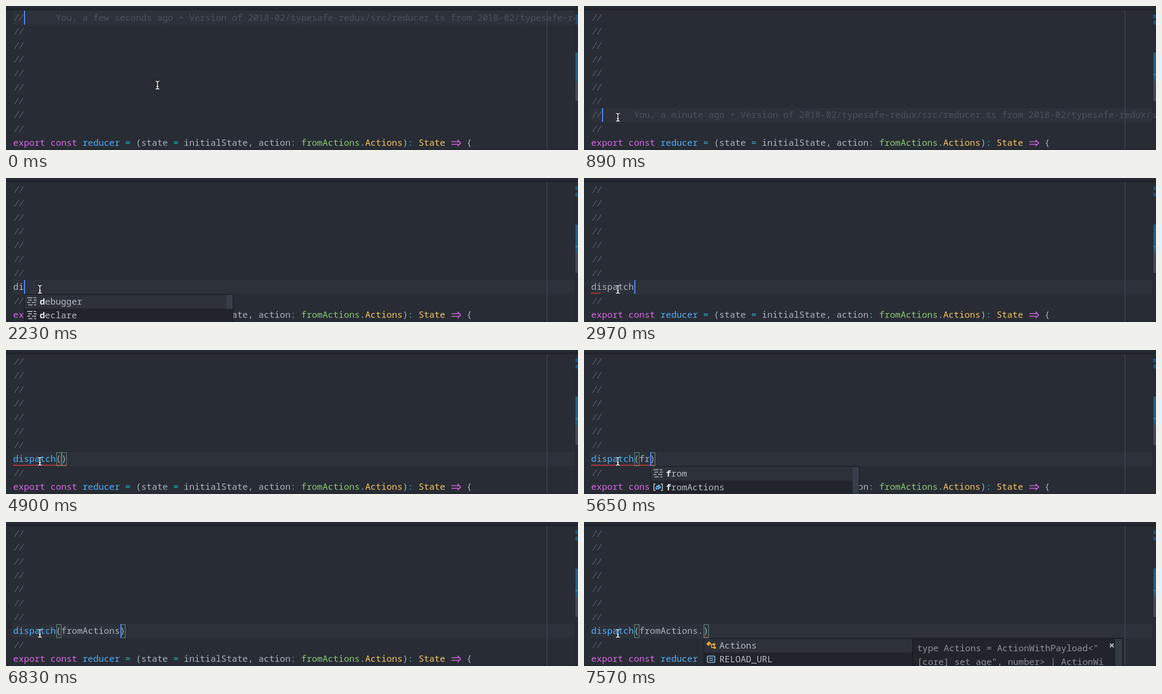
Recreate the animation shown at these times as an HTML page. Size 1080x273 px, loop 8 s.

```html
<!DOCTYPE html>
<html lang="en">
<head>
<meta charset="utf-8">
<title>Editor autocomplete</title>
<style>
  html, body { margin: 0; width: 100%; height: 100%; overflow: hidden; background: #282c34; }
  svg { display: block; width: 1080px; height: 273px; }
  text { font: 16.8px "Noto Sans Mono", "DejaVu Sans Mono", monospace; fill: #abb2bf; white-space: pre; font-variant-ligatures: none; }
  .comment { font-style: italic; fill: #5c6370; letter-spacing: -1.2px; }
  .blame { fill: #4c525d; }
  .kw { fill: #d968e6; }
  .fn { fill: #4db1fa; }
  .op { fill: #2bbac5; }
  .ns { fill: #8bcb72; }
  .type { fill: #f3c463; }
  .item { fill: #b6bac2; }
  .hit { fill: #e4e7ec; font-weight: 700; }
  .doc { fill: #8c929d; }
  .line { fill: none; }
</style>
</head>
<body>
<svg id="stage" viewBox="0 0 1080 273"></svg>
<script>
const LOOP = 8000, CHAR = 10.08, LEFT = 13.6, LINE = 26.35, TOP = 9;
const LIST_W = 395, DOC_W = 396, EDIT_ROW = 7;

const colX = c => LEFT + c * CHAR;
const snapX = c => Math.ceil(colX(c));
const rowY = r => TOP + r * LINE;
const esc = s => s.replace(/&/g, '&amp;').replace(/</g, '&lt;').replace(/>/g, '&gt;');
const rect = (x, y, w, h, fill, extra = '') =>
  `<rect x="${x}" y="${y}" width="${w}" height="${h}" fill="${fill}" ${extra}/>`;
const span = (cls, s) => `<tspan class="${cls}">${esc(s)}</tspan>`;
const text = (x, y, body, cls = '') => `<text x="${x}" y="${y}" class="${cls}">${body}</text>`;
const path = (d, color, width) =>
  `<path class="line" d="${d}" stroke="${color}" stroke-width="${width}"/>`;
const codeLine = (r, body, cls) => text(LEFT, rowY(r) + 18.8, body, cls);

const repo = '2018-02/typesafe-redux/src/reducer.ts';
const blameText = age => `You, ${age} ago • Version of ${repo} from ${repo}`;

const lists = {
  d: { items: [['word', 'debugger', 1], ['word', 'declare', 1]], thumb: 26, doc: ['debugger'] },
  f: { items: [['word', 'from', 1], ['cube', 'fromActions', 1]], thumb: 52, doc: ['from'] },
  from: { items: [['word', 'from', 4], ['cube', 'fromActions', 4]], thumb: 52, doc: ['from'] },
  member: {
    items: [['type', 'Actions', 0], ['value', 'RELOAD_URL', 0]], thumb: 0,
    doc: ['type Actions = ActionWithPayload<"', '[core] set age", number> | ActionWi'], docThumb: 52
  }
};

// Each step changes only the listed fields and holds until the next one.
const start = {
  move: 0, row: 0, caret: 2, blame: 'a few seconds', sel: false, marks: false,
  code: null, call: false, wave: null, pair: null, list: null, at: 0, doc: false
};
const changes = [
  [150, { move: .1 }],
  [300, { move: .38 }],
  [450, { move: .74 }],
  [600, { move: .95 }],
  [740, { move: 1, row: EDIT_ROW, blame: null }],
  [890, { blame: 'a minute' }],
  [1190, { sel: true, row: -1, caret: -1, blame: null }],
  [1340, { marks: true }],
  [1780, { blame: 'a minute' }],
  [1930, { sel: false, marks: false, blame: null, row: EDIT_ROW, code: 'd', caret: 1 }],
  [2080, { list: 'd', at: 1 }],
  [2230, { code: 'di', caret: 2, at: 2 }],
  [2380, { wave: [0, 2] }],
  [2520, { doc: true }],
  [2820, { code: 'dispatc', caret: 7, list: null, doc: false }],
  [2970, { code: 'dispatch', caret: 8 }],
  [3270, { wave: null }],
  [3570, { caret: -1 }],
  [4010, { code: 'dispatch()', caret: 9 }],
  [4160, { call: true }],
  [4460, { wave: [0, 10], pair: [8, 9] }],
  [4900, { caret: -1 }],
  [5500, { code: 'dispatch(f)', caret: 10, wave: [0, 11], pair: [8, 10] }],
  [5650, { code: 'dispatch(fr)', caret: 11, wave: [0, 12], pair: [8, 11], list: 'f', at: 11 }],
  [5790, { code: 'dispatch(fro)', caret: 12, wave: [0, 13], pair: [8, 12], at: 12, doc: true }],
  [6090, { code: 'dispatch(from)', caret: 13, wave: null, pair: [8, 13], list: 'from', at: 13, doc: false }],
  [6240, { wave: [9, 13], caret: -1 }],
  [6390, { doc: true }],
  [6680, { code: 'dispatch(fromActions)', caret: 20, wave: [9, 20], pair: [8, 20], list: null, doc: false }],
  [6830, { wave: null }],
  [6980, { code: 'dispatch(fromActions.)', caret: 21, pair: [8, 21] }],
  [7130, { list: 'member', at: 21 }],
  [7270, { wave: [21, 22] }],
  [7420, { doc: true }],
  [7570, { caret: -1 }]
];
const steps = [[0, start]];
for (const [t, part] of changes) steps.push([t, { ...steps[steps.length - 1][1], ...part }]);

const icons = {
  word: (x, y) => path(
    `M${x} ${y - 7}h10m2 0h5 M${x + 2} ${y - 2.5}h7m3 0h6 M${x} ${y + 2}h6m3 0h8 M${x + 2} ${y + 6.5}h8m3 0h4`,
    '#b9bdc4', 1.7),
  cube: (x, y) =>
    path(`M${x + 4} ${y - 6}h-3v12h3 M${x + 14} ${y - 6}h3v12h-3`, '#b9bdc4', 1.7) +
    `<path d="M${x + 4} ${y - 1}l6 -4 4 2v4l-6 4 -4 -2z" fill="#6db9f5"/>` +
    path(`M${x + 4} ${y - 1}l4 2 6 -4 M${x + 8} ${y + 1}v4`, '#21252b', 1),
  type: (x, y) =>
    path(`M${x + 6} ${y - 2}h6 M${x + 9} ${y - 2}v6h4`, '#f0a030', 1.7) +
    `<path d="M${x - 1} ${y - 3}l5 -5 4 4 -5 5z M${x + 10} ${y - 2}l3 -3 4 3 -3 3z M${x + 11} ${y + 4}l3 -3 4 3 -3 3z" fill="#f0a030"/>`,
  value: (x, y) =>
    rect(x + 1, y - 6, 14, 12, 'none', 'rx="1.5" stroke="#8cc4ec" stroke-width="1.6"') +
    path(`M${x + 4} ${y - 2}h8 M${x + 4} ${y + 2}h8`, '#8cc4ec', 1.5)
};

function wave([from, to]) {
  const x0 = colX(from) - .5, x1 = colX(to) - .5;
  let d = '';
  for (let x = x0, up = 0; x <= x1; x += 3, up ^= 1) d += `${d ? 'L' : 'M'}${x} ${up ? 217.4 : 219.6}`;
  return path(d, '#e33b3b', 1.2);
}

function docPane(x, list) {
  const h = list.doc.length > 1 ? 60 : 46;
  let out = rect(x + .5, 220.5, DOC_W - 1, h, '#21252b', 'stroke="#181a1f"');
  list.doc.forEach((s, i) => { out += text(x + 8, 245 + i * 25.5, esc(s), 'doc'); });
  if (list.docThumb) out += rect(x + 382, 222, 13, list.docThumb, '#353b45');
  return out + path(`M${x + 372} 230.5l7 7m0 -7l-7 7`, '#c5c8ce', 1.9);
}

function popup(s) {
  const list = lists[s.list], x = snapX(s.at);
  let out = rect(x + .5, 220.5, LIST_W - 1, 70, '#21252b', 'stroke="#181a1f"') +
    rect(x + 1, 221, LIST_W - 2, 26.5, '#2c313a');
  list.items.forEach(([icon, label, n], i) => {
    const y = 234 + i * 26.2;
    out += icons[icon](x + 6, y) +
      text(x + 29.5, y + 6, span('hit', label.slice(0, n)) + span('item', label.slice(n)));
  });
  if (list.thumb) out += rect(x + 382, 222, 12, list.thumb, '#383e49');
  return out + (s.doc ? docPane(x + LIST_W, list) : '');
}

function pointer(p) {
  const x = 286 - 222 * p, y = 150 + 61 * p;
  const d = `M${x - 3.5} ${y - 7.5}q3 0 3.5 2q.5 -2 3.5 -2 M${x} ${y - 6}v12 M${x - 3.5} ${y + 7.5}q3 0 3.5 -2q.5 2 3.5 2 M${x - 2} ${y + 2.5}h4`;
  return path(d, '#15171b', 3.4) + path(d, '#ffffff', 1.5);
}

const signature = codeLine(9,
  span('kw', 'export const ') + span('fn', 'reducer ') + span('op', '= ') + '(state ' +
  span('op', '= ') + 'initialState, action' + span('op', ': ') + span('ns', 'fromActions') + '.' +
  span('type', 'Actions') + ')' + span('op', ': ') + span('type', 'State') + '    {') +
  path('M841 257.2h14.5 M841 262.2h14.5 M852.5 253.6l6 6.1l-6 6.1', '#d968e6', 1.6);

function overview(s) {
  const early = s.row === 0;
  return rect(1074, 8, 1, 265, '#23272e') +
    rect(1075, 88, 5, 92, '#454a53') + rect(1075, 88, 5, 54, '#205f8a') +
    (early ? rect(1075, 16, 5, 19, '#174f76')
      : rect(1075, 16, 5, 7, '#14598a') + rect(1075, 28, 5, 7, '#14598a') +
        rect(1075, 129, 5, 2, '#3483b5'));
}

function draw(s) {
  let out = rect(0, 0, 1080, 273, '#282c34');
  if (s.row >= 0) out += rect(13, rowY(s.row), 1062, LINE, '#2c313a');
  if (s.marks) for (let r = 0; r < 9; r++) out += rect(13, rowY(r), 21, LINE, '#2f353f', 'rx="3"');
  if (s.sel) out += rect(13, rowY(EDIT_ROW) + .3, 21, LINE, '#414857', 'rx="3"');

  for (let r = 0; r < 9; r++) {
    if (r !== EDIT_ROW || s.code === null) out += codeLine(r, '//', 'comment');
  }
  if (s.code !== null) {
    out += codeLine(EDIT_ROW, span(s.call ? 'fn' : '', s.code.slice(0, 8)) + esc(s.code.slice(8)));
  }
  if (s.blame) {
    const r = s.row === 0 ? 0 : EDIT_ROW;
    out += text(colX(8), rowY(r) + 18.8, blameText(s.blame), 'blame');
  }
  out += signature;

  if (s.wave) out += wave(s.wave);
  if (s.pair) for (const c of s.pair) {
    out += rect(snapX(c) + .5, 194.5, 8.6, 25, 'none', 'stroke="#6d9580"');
  }
  if (s.caret >= 0) out += rect(snapX(s.caret), rowY(s.row), 2, LINE, '#528bff');

  out += rect(1021, 8, 1, 265, '#4b515c') + overview(s);
  out += rect(0, 0, 1080, 6, '#262a31') + rect(0, 5.5, 1080, 2, '#1c1f25') + rect(0, 272, 1080, 1, '#21252b');
  if (s.list) out += popup(s);
  return out + pointer(s.move);
}

const stage = document.getElementById('stage');
const origin = performance.now();
let shown = -1;

function tick() {
  const t = (performance.now() - origin) % LOOP;
  let i = steps.length - 1;
  while (steps[i][0] > t) i--;
  if (i !== shown) {
    shown = i;
    stage.innerHTML = draw(steps[i][1]);
  }
  requestAnimationFrame(tick);
}
tick();
</script>
</body>
</html>
```
